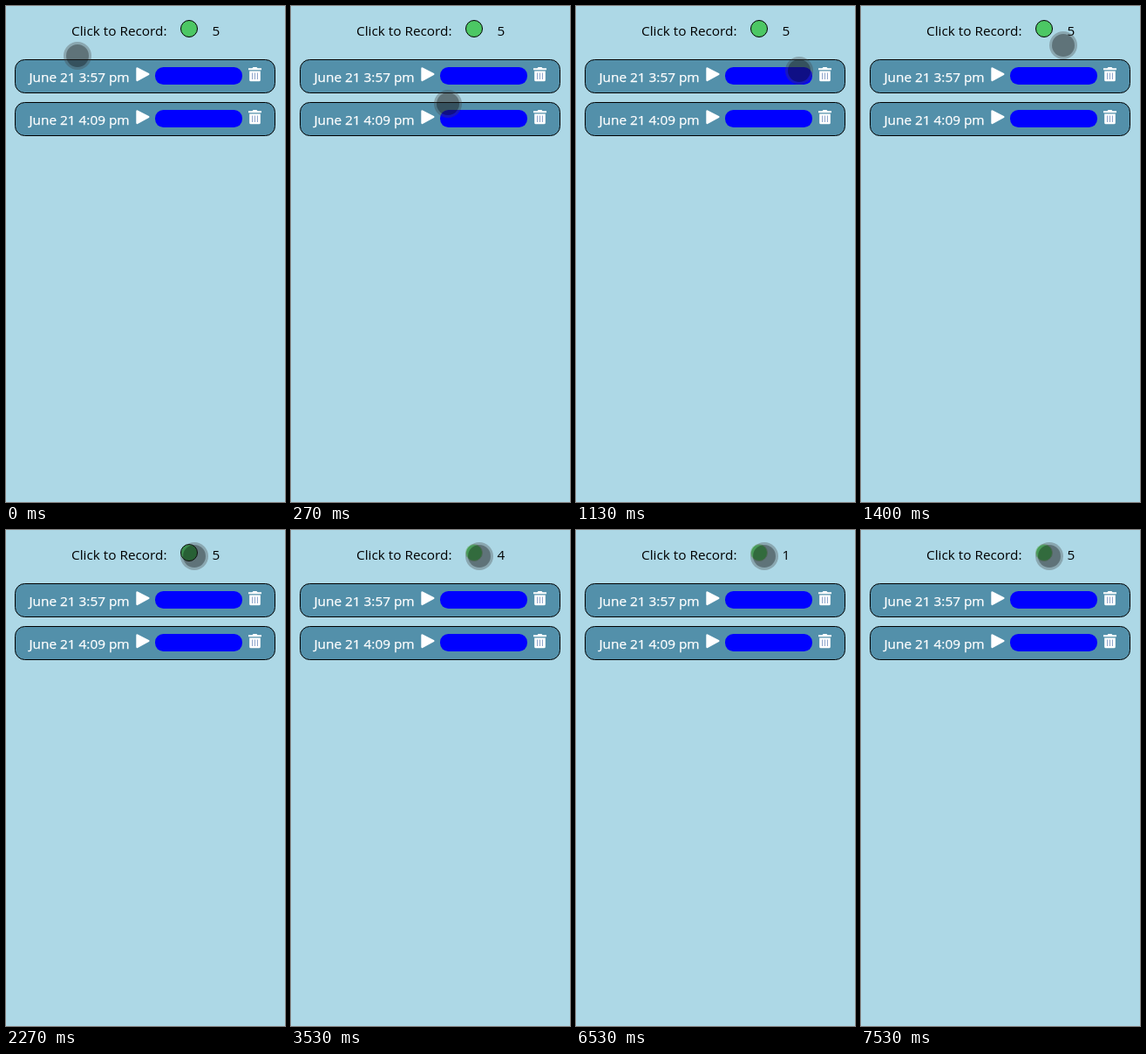
Write an HTML page that moves like this. It is 320 by 568 pixels and loops after 8 s.

```html
<!DOCTYPE html>
<html lang="en">
<head>
<meta charset="utf-8">
<title>Voice recorder</title>
<style>
  html, body { margin: 0; width: 100%; height: 100%; overflow: hidden; background: #add8e6; }
  svg { display: block; width: 100%; height: 100%; }
  text { font: 15.35px "Open Sans", "Noto Sans", sans-serif; }
  .date { fill: #fff; stroke: #fff; stroke-width: .25px; }
</style>
</head>
<body>
<svg viewBox="0 0 320 568">
  <defs>
    <g id="row">
      <rect x="10.5" y="61.5" width="298" height="38" rx="11" fill="#5390aa" stroke="#000"/>
      <path d="M150.5 71.5 L163.3 78 L150.5 85 Z" fill="#fff" stroke="#fff" stroke-width="2.4" stroke-linejoin="round"/>
      <rect x="171" y="70" width="100" height="20" rx="9.5" fill="#00f"/>
      <path d="M278 71.2h4.5l1-1.2h4l1 1.2h4.5v2h-15z M279.2 74.5h12.6v10.2q0 1.5-1.5 1.5h-9.6q-1.5 0-1.5-1.5z" fill="#fff"/>
      <path d="M282.5 76.5v7.5m3 -7.5v7.5m3 -7.5v7.5" stroke="#8fa6cc"/>
    </g>
  </defs>
  <text x="75" y="34">Click to Record:</text>
  <circle id="button" cx="210" cy="26" r="9.5"/>
  <text id="count" x="240.8" y="34" text-anchor="middle"></text>
  <use href="#row"/>
  <use href="#row" y="49"/>
  <text class="date" x="26.5" y="86.5">June 21 3:57 pm</text>
  <text class="date" x="26.5" y="135.5">June 21 4:09 pm</text>
  <g id="cursor">
    <circle r="16" fill="#444" fill-opacity=".33"/>
    <circle r="13" fill-opacity=".31"/>
  </g>
</svg>
<script>
const LOOP = 8000;
const CLICK = 2530;
const TICKS_PER_MS = 0.015;
const [button, count, cursor] = ["button", "count", "cursor"].map(id => document.getElementById(id));

// The pointer rests between glides; each glide bends towards its control point.
const home = [82, 57];
const glides = [
  { start: 0, end: 730, bend: [196, 149], to: [250, 92] },
  { start: 800, end: 930, bend: [250, 90], to: [250, 87] },
  { start: 1070, end: 1400, bend: [268, 66], to: [232, 45] },
  { start: 1400, end: 1670, bend: [222, 33], to: [213, 22] },
  { start: 1800, end: 1930, bend: [215, 26], to: [216, 30] }
];

const bezier = (a, b, c, u) => (1 - u) ** 2 * a + 2 * u * (1 - u) * b + u * u * c;

function pointerAt(t) {
  let position = home;
  for (const { start, end, bend, to } of glides) {
    const progress = Math.min(1, Math.max(0, (t - start) / (end - start)));
    const eased = progress ** 0.7;
    position = position.map((from, i) => bezier(from, bend[i], to[i], eased));
    if (progress < 1) break;
  }
  return position.map(Math.round);
}

function render(t) {
  const tick = Math.floor(t * TICKS_PER_MS + 0.06);
  cursor.setAttribute("transform", `translate(${pointerAt(tick / TICKS_PER_MS)})`);

  const pressed = t >= 2270 && t < 2730;
  button.setAttribute("fill", pressed ? "#38b153" : "#4cc764");
  button.setAttribute("stroke", t < CLICK ? "#000" : "#93bfa8");

  const elapsed = Math.max(0, Math.floor((t - CLICK) / 1000));
  count.textContent = 5 - elapsed % 5;
}

const start = performance.now();
function loop() {
  render((performance.now() - start) % LOOP);
  requestAnimationFrame(loop);
}
loop();
</script>
</body>
</html>
```
